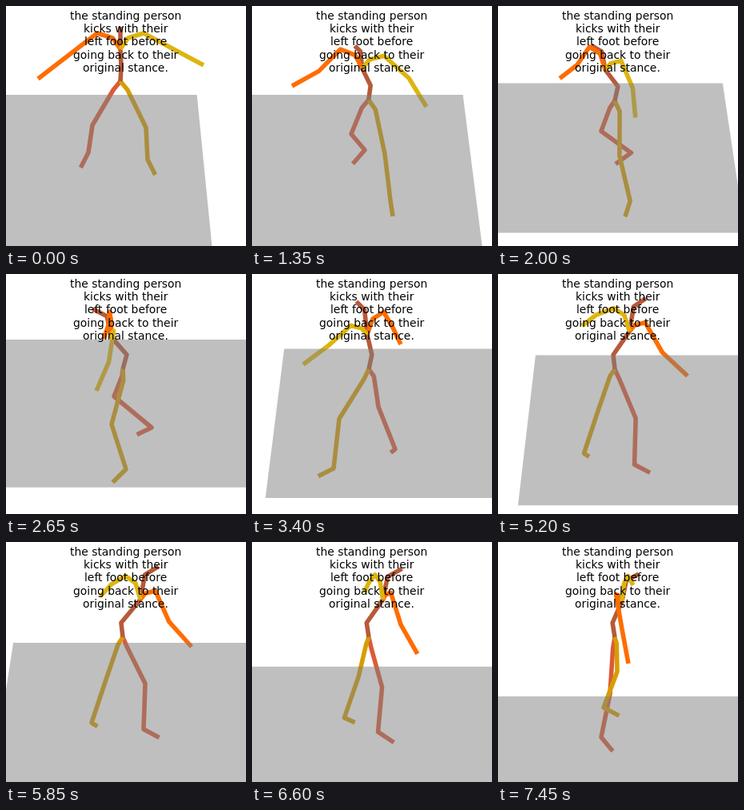
Write an HTML page with a canvas that moves like this. It is 300 px wide and 300 px high and loops after 7500 ms.

```html
<!DOCTYPE html>
<html>
<head>
<meta charset="utf-8">
<style>
html, body { margin: 0; width: 100%; height: 100%; overflow: hidden; background: #fff; }
canvas { display: block; }
</style>
</head>
<body>
<canvas id="stage" width="300" height="300"></canvas>
<script>
const ctx = document.getElementById('stage').getContext('2d');
const LOOP = 7500, STEP = 50;
const title = ['the standing person', 'kicks with their', 'left foot before',
  'going back to their', 'original stance.'];

// Key poses. heading: degrees the body faces (90 = viewer), lean: chest shift,
// floor: far edge y and slope of the right side, hands: orange then yellow,
// red and gold: knee and ankle of each leg. All other joints follow from these.
const poses = [
  { at: 0, heading: 90, lean: 0, floor: [111, .0995],
    hands: [40, 91, 247, 74], red: [108, 149, 103, 183], gold: [175, 152, 177, 192] },
  { at: 1350, heading: 110, lean: -8, floor: [111, .1275],
    hands: [50, 100, 218, 126], red: [124, 160, 141, 180], gold: [166, 185, 173, 243] },
  { at: 2650, heading: 175, lean: -14, floor: [82, .18],
    hands: [122, 81, 113, 146], red: [135, 153, 182, 192], gold: [132, 188, 150, 244] },
  { at: 3400, heading: 225, lean: -2, floor: [93.5, .2453],
    hands: [186, 88, 64, 113], red: [158, 166, 179, 219], gold: [109, 181, 102, 243] },
  { at: 4500, heading: 315, lean: 11, floor: [87, .2881],
    hands: [239, 123, 92, 61], red: [168, 184, 169, 243], gold: [125, 170, 108, 222] },
  { at: 5850, heading: 320, lean: 22, floor: [126, .2155],
    hands: [232, 131, 118, 68], red: [174, 177, 172, 234], gold: [125, 172, 107, 226] },
  { at: 7450, heading: 375, lean: 9, floor: [193, .19],
    hands: [163, 152, 169, 54], red: [140, 190, 129, 244], gold: [149, 162, 132, 207] }];
const last = poses.length - 1;
const FLOOR_WIDTH = .371, VANISH = { x: 150, y: -780 };

// Monotone cubic through the key poses for one number, picked by get
function ease(get, t) {
  let i = 0;
  while (i < last - 1 && t >= poses[i + 1].at) i++;
  const slope = j => (get(poses[j + 1]) - get(poses[j])) / (poses[j + 1].at - poses[j].at);
  const tangent = j => {
    if (j === 0) return slope(0);
    if (j === last) return slope(last - 1);
    const a = slope(j - 1), b = slope(j);
    return a * b > 0 ? 2 * a * b / (a + b) : 0;
  };
  const h = poses[i + 1].at - poses[i].at, u = (t - poses[i].at) / h, v = 1 - u;
  return get(poses[i]) * v * v * (1 + 2 * u) + get(poses[i + 1]) * u * u * (3 - 2 * u)
    + h * u * v * (tangent(i) * v - tangent(i + 1) * u);
}

const easeAll = (key, t) => poses[0][key].map((_, c) => ease(p => p[key][c], t));
const add = ([x, y], dx, dy) => [x + dx, y + dy];
const between = (a, b, u, v = u) => [a[0] + (b[0] - a[0]) * u, a[1] + (b[1] - a[1]) * v];

function trace(points) {
  ctx.beginPath();
  for (const p of points) ctx.lineTo(...p);
}

function limb(color, points) {
  trace(points);
  ctx.strokeStyle = color;
  ctx.stroke();
}

function drawBody(t) {
  const angle = ease(p => p.heading, t) * Math.PI / 180;
  const lean = ease(p => p.lean, t);
  const hands = easeAll('hands', t);
  const cos = Math.cos(angle), turn = -Math.sin(angle);

  // The body settles quickly from its opening hop
  const hop = Math.exp(-t / 500);
  const root = [146 - 3 * hop, 119 - 25 * hop];
  const waist = add(root, 1 - 4 * cos, -18);
  const chest = add(root, lean, -43 - 3 * turn - 3 * cos);
  const head = add(chest, 18 * cos + .4 * lean, -36 - 8 * turn);

  // side is 1 for the red and orange half, -1 for the gold and yellow half
  const leg = (side, [kx, ky, ax, ay]) => {
    const hip = add(root, side * turn * 9, 11 + side * cos * 3);
    const foot = angle + side * .5;
    const toe = add([ax, ay], 20 * Math.cos(foot), 12 + 8 * Math.sin(foot));
    return [root, hip, [kx, ky], [ax, ay], toe];
  };
  const arm = (side, hand) => {
    const shoulder = add(chest, side * turn * 29, -20 + side * cos * 12);
    const collar = between(chest, shoulder, .33, .7);
    const bend = .08 * Math.sin(2 * Math.PI * t / LOOP);
    const elbow = add(between(shoulder, hand, .5),
      bend * (hand[1] - shoulder[1]), bend * (shoulder[0] - hand[0]));
    return [chest, collar, shoulder, elbow, hand];
  };

  ctx.lineWidth = 5.56;
  ctx.lineJoin = 'round';
  limb('#dd5a37', leg(1, easeAll('red', t)));
  limb('#d69e00', leg(-1, easeAll('gold', t)));
  limb('#b75a39', [root, waist, between(chest, waist, .33), chest,
    between(chest, head, .25, .75), head]);
  limb('#ff6d00', arm(1, hands.slice(0, 2)));
  limb('#ddb50e', arm(-1, hands.slice(2)));
}

function drawFloor(t) {
  const [far, right] = easeAll('floor', t);
  const left = right - FLOOR_WIDTH, near = 1.15 * far + 172.5;
  const corner = (k, y) => [VANISH.x + k * (y - VANISH.y), y];
  trace([corner(left, far), corner(right, far), corner(right, near), corner(left, near)]);
  ctx.fillStyle = 'rgba(128,128,128,.5)';
  ctx.fill();
}

function drawTitle() {
  ctx.fillStyle = '#000';
  ctx.font = '13.89px "DejaVu Sans", sans-serif';
  title.forEach((line, i) => {
    const x = Math.floor(150 - ctx.measureText(line).width / 2);
    ctx.fillText(line, x, Math.round(16.9 + i * 16.25));
  });
}

function draw(t) {
  ctx.fillStyle = '#fff';
  ctx.fillRect(0, 0, 300, 300);
  drawBody(t);
  drawFloor(t);
  drawTitle();
}

const start = performance.now();
function tick() {
  const t = (performance.now() - start) % LOOP;
  draw(Math.floor(t / STEP) * STEP);
  requestAnimationFrame(tick);
}
tick();
</script>
</body>
</html>
```
